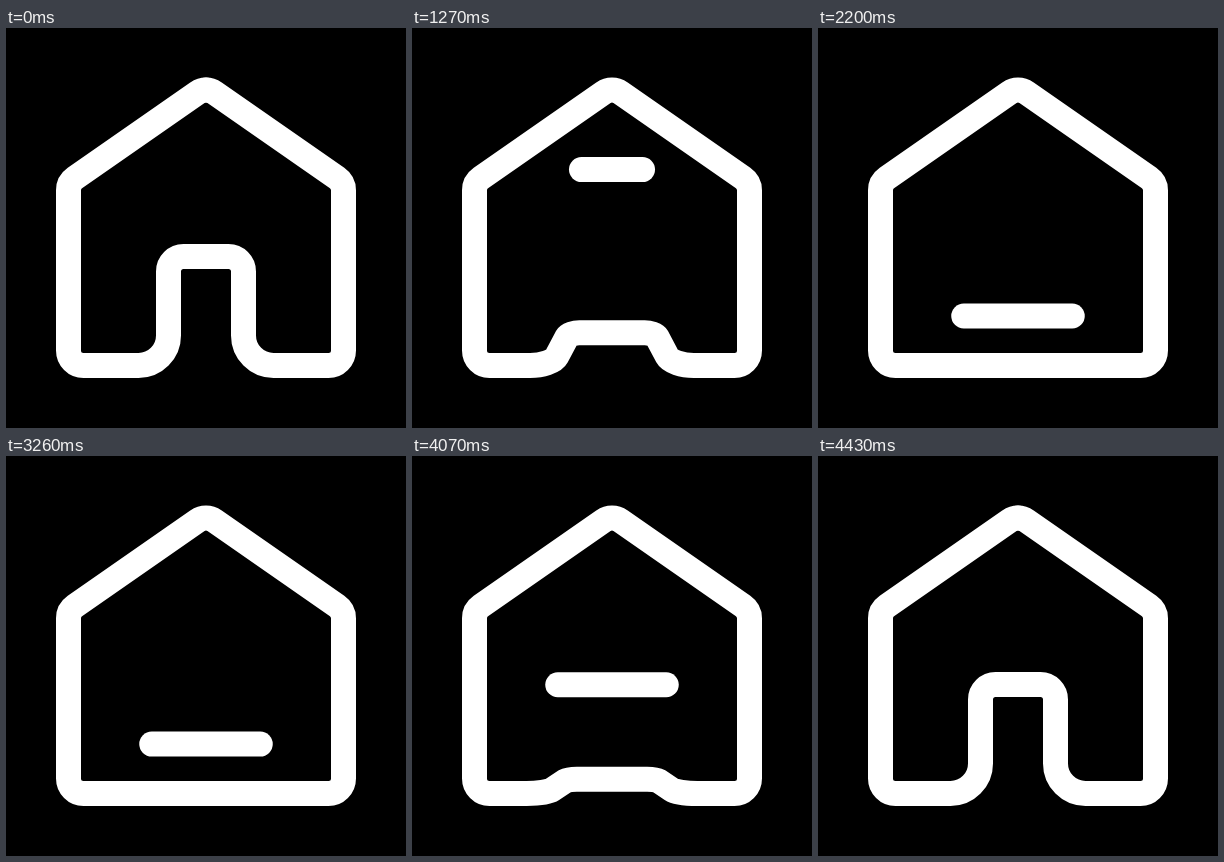
Animation, 400 px wide and 400 px high, one loop 4.46 s. Source, as an HTML page:

```html
<!DOCTYPE html>
<html lang="en">
<head>
<meta charset="utf-8">
<title>Home icon</title>
<style>
  html, body { margin: 0; width: 100%; height: 100%; overflow: hidden; background: #000; }
  svg { display: block; width: 100%; height: 100%; }
  path { fill: none; stroke: #fff; stroke-width: 25; stroke-linecap: round; stroke-linejoin: round; }
</style>
</head>
<body>
<svg viewBox="0 0 400 400">
  <path id="house"/>
  <path id="bar"/>
</svg>
<script>
const LOOP = 4460, HALF = LOOP / 2, HOLD = 1000, STEP = 30, STEPS = 40;
const FLOOR = 337.5;
const house = document.getElementById('house');
const bar = document.getElementById('bar');

const clamp = x => Math.min(1, Math.max(0, x));
const mix = (a, b, k) => a + (b - a) * k;

// Timing curve through (0,0), (x1,0), (x2,1), (1,1)
function ease(x1, x2) {
  return x => {
    x = clamp(x);
    let lo = 0, hi = 1;
    for (let i = 0; i < 30; i++) {
      const s = (lo + hi) / 2, r = 1 - s;
      if (3 * r * r * s * x1 + 3 * r * s * s * x2 + s * s * s < x) lo = s; else hi = s;
    }
    return lo * lo * (3 - 2 * lo);
  };
}
const glide = ease(.57, .15);
const sink = ease(.34, .24);

const mirror = ([x, y]) => [400 - x, y];
const at = p => p.map(v => v.toFixed(2)).join(' ');

// Rounded corner from the current point a to b around c
function corner(a, c, b) {
  const toward = p => [mix(p[0], c[0], .552), mix(p[1], c[1], .552)];
  return `C${at(toward(a))} ${at(toward(b))} ${at(b)}`;
}

// k = 0: open doorway, k = 1: flat floor
function housePath(k) {
  const point = (x, y, flatX) => [mix(x, flatX, k), mix(y, FLOOR, k)];
  const foot = point(132.5, FLOOR, 112);
  const footCorner = point(162.5, FLOOR, 130);
  const jamb = point(162.5, 307.5, 137);
  const lintel = point(162.5, 243.5, 151.5);
  const lintelCorner = point(162.5, 228.5, 155.5);
  const top = point(177.5, 228.5, 163);
  return `M${at(foot)}${corner(foot, footCorner, jamb)}L${at(lintel)}` +
    `${corner(lintel, lintelCorner, top)}L${at(mirror(top))}` +
    `${corner(mirror(top), mirror(lintelCorner), mirror(lintel))}L${at(mirror(jamb))}` +
    `${corner(mirror(jamb), mirror(footCorner), mirror(foot))}` +
    'H322.5A15 15 0 0 0 337.5 322.5V162.3A15 15 0 0 0 331.1 150' +
    'L208.6 64.8A15 15 0 0 0 191.4 64.8L68.9 150A15 15 0 0 0 62.5 162.3' +
    'V322.5A15 15 0 0 0 77.5 337.5Z';
}

// The bar drops out of the roof, dips below its rest and settles
function barPath(p) {
  const peak = .65;
  const y = p < peak ? mix(62, 305, glide(p / peak))
                     : mix(305, 288, glide((p - peak) / (1 - peak)));
  const half = 54.25 * clamp(p / .3) ** 2 + .01;
  return `M${200 - half} ${y}H${200 + half}`;
}

function draw(now) {
  const t = now % LOOP;
  const closing = t >= HALF;
  const local = t - (closing ? HALF : 0);
  const run = clamp(Math.floor((local - HOLD) / STEP) / STEPS);
  const p = closing ? 1 - run : run;
  house.setAttribute('d', housePath(sink(p / .5)));
  bar.setAttribute('d', barPath(p));
}

function tick() {
  draw(performance.now());
  requestAnimationFrame(tick);
}
tick();
</script>
</body>
</html>
```
